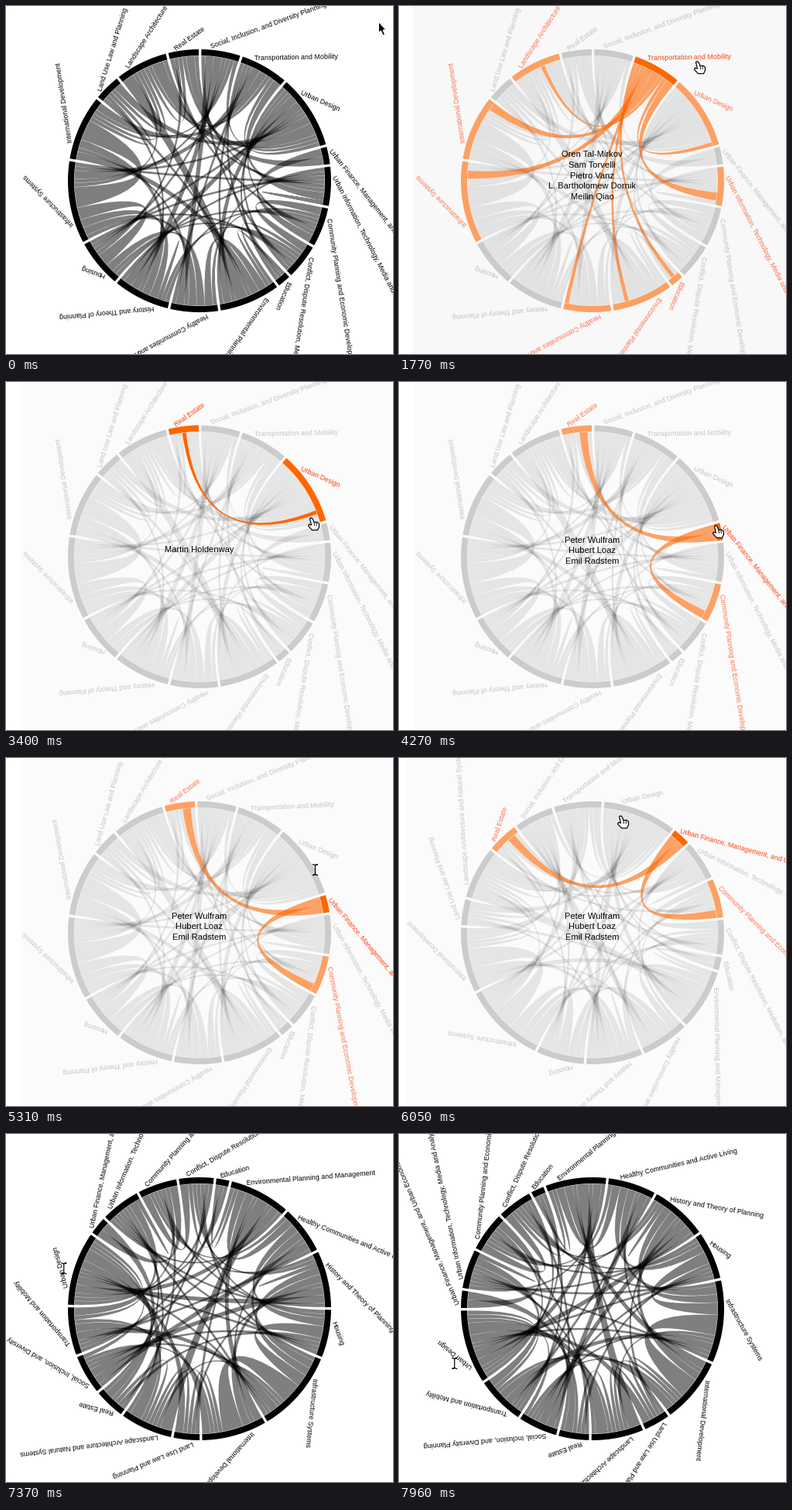
A matplotlib script that plays this animation: 500 by 450 pixels, repeating every 8 s.

```python
import numpy as np
import matplotlib.pyplot as plt
from matplotlib.animation import FuncAnimation
from matplotlib.collections import PathCollection
from matplotlib.patches import Polygon, Rectangle
from matplotlib.path import Path
from matplotlib.transforms import Affine2D

W, H, DPI = 500, 450, 100
CX, CY = 250, 226
R_OUT, R_IN, R_CHORD = 170, 162, 161.6
PAD, START = 1.15, 102.2
INTERVAL, FRAMES, STEP = 40, 200, 147.4

LABELS = {
    "com": "Community Planning and Economic Development",
    "con": "Conflict, Dispute Resolution, Mediation, and Negotiation",
    "edu": "Education",
    "env": "Environmental Planning and Management",
    "hea": "Healthy Communities and Active Living",
    "his": "History and Theory of Planning",
    "hou": "Housing",
    "inf": "Infrastructure Systems",
    "int": "International Development",
    "law": "Land Use Law and Planning",
    "lan": "Landscape Architecture and Natural Systems",
    "est": "Real Estate",
    "soc": "Social, Inclusion, and Diversity Planning",
    "tra": "Transportation and Mobility",
    "urb": "Urban Design",
    "fin": "Urban Finance, Management, and Urban Economics",
    "med": "Urban Information, Technology, Media and Analytics",
}
LINKS = {
    "com": "con2 hea1 his1 hou1 est1 urb1 fin2",
    "con": "env1 his1 hou1 inf1 soc1 urb1",
    "edu": "env1 tra1 urb1",
    "env": "hea2 int2 law1 lan3 tra1 urb2 med1",
    "hea": "hou2 inf2 int1 soc2 tra1",
    "his": "his1 inf2 int2 law1 soc2 urb2 med1",
    "hou": "inf3 est1 soc1 urb1 med1",
    "inf": "int5 lan1 soc1 tra2 urb1 med1",
    "int": "law1 lan1 soc1 tra2",
    "law": "lan1 urb2",
    "lan": "est1 tra1 urb3 med1",
    "est": "urb1 fin2 med1",
    "soc": "urb1",
    "tra": "urb1 med2",
    "med": "med1",
}
KEYS = list(LABELS)
N = len(KEYS)
ID = {key: i for i, key in enumerate(KEYS)}
EST, TRA, URB, FIN = (ID[key] for key in ("est", "tra", "urb", "fin"))

# Hover changes: step, hovered groups, background grey, names in the middle
HOVERS = [
    (0, (), 1.0, []),
    (5, (TRA,), 0.972, ["Oren Tal-Mirkov", "Sam Torvelli", "Pietro Vanz",
                        "L. Bartholomew Dornik", "Meilin Qiao"]),
    (15, (URB,), 0.976, ["Oren Tal-Mirkov", "Martin Holdenway", "Meilin Qiao"]),
    (20, (EST, URB), 0.984, ["Martin Holdenway"]),
    (26, (FIN,), 0.984, ["Peter Wulfram", "Hubert Loaz", "Emil Radstem"]),
    (43, (), 1.0, []),
]
FADE = 4

ORANGE = (1, 0.4, 0)
RED = (1, 0.25, 0.06)
BLACK = (0, 0, 0)


# ---------- layout ----------
matrix = np.zeros((N, N), int)
for key, row in LINKS.items():
    for link in row.split():
        a, b, n = ID[key], ID[link[:3]], int(link[3:])
        matrix[a, b] = matrix[b, a] = n

UNIT = (360 - N * PAD) / matrix.sum()
sizes = matrix.sum(axis=1) * UNIT
starts = START + np.concatenate([[0], np.cumsum(sizes + PAD)[:-1]])
sub_ends = starts[:, None] + np.cumsum(matrix, axis=1) * UNIT
sub_starts = sub_ends - matrix * UNIT
PAIRS = [(a, b) for a in range(N) for b in range(a, N) if matrix[a, b]]


def polar(angle, radius):
    """Clockwise degrees from the top, with y pointing down."""
    t = np.radians(angle)
    return np.column_stack([radius * np.sin(t), -radius * np.cos(t)])


def arc(a0, a1, radius):
    return polar(np.linspace(a0, a1, max(4, int(abs(a1 - a0)) + 2)), radius)


def ring_path(i):
    a0, a1 = starts[i], starts[i] + sizes[i]
    pts = np.vstack([arc(a0, a1, R_OUT), arc(a1, a0, R_IN)])
    return Path(np.vstack([pts, pts[:1]]))


def chord_path(a, b, inset=0.05):
    ends = [arc(sub_starts[p, q] + inset, sub_ends[p, q] - inset, R_CHORD)
            for p, q in ((a, b), (b, a))]
    hub = [[0, 0]]
    verts = np.vstack([ends[0], hub, ends[1], hub, ends[0][:1]])
    codes = ([Path.MOVETO] + [Path.LINETO] * (len(ends[0]) - 1)
             + [Path.CURVE3] * 2 + [Path.LINETO] * (len(ends[1]) - 1)
             + [Path.CURVE3] * 2)
    return Path(verts, codes)


RINGS = [ring_path(i) for i in range(N)]
CHORDS = [chord_path(a, b) for a, b in PAIRS]


# ---------- colours of one hover state ----------
def rank_chord(pair, hover):
    """2 = hovered, 1 = related, 0 = not involved."""
    if len(hover) == 2:
        return 2 if pair == hover else 0
    return 1 if hover and hover[0] in pair else 0


def rank_group(i, hover):
    if i in hover:
        return 2
    return 1 if len(hover) == 1 and matrix[i, hover[0]] else 0


def shades(ranks, hover, idle, dim, hot, warm):
    if not hover:
        return np.array([(*BLACK, idle)] * len(ranks))
    table = [(*BLACK, dim), (*hot, warm), (*hot, 1)]
    return np.array([table[r] for r in ranks])


def look(hover):
    groups = [rank_group(i, hover) for i in range(N)]
    chords = [rank_chord(p, hover) for p in PAIRS]
    return (shades(chords, hover, 0.5, 0.085, ORANGE, 0.6),
            shades(groups, hover, 1, 0.185, ORANGE, 0.6),
            shades(groups, hover, 1, 0.22, RED, 0.72),
            np.array(chords))


LOOKS = [look(h[1]) for h in HOVERS]


# ---------- motion ----------
def rotation(k):
    return np.interp(k, [35, 36, 38, 41, 46, 54],
                     [0, -1.7, -11, -36.2, -94.5, -164.7])


def cursor_at(k):
    if k >= 36:
        keys = [36, 41, 46, 54]
        angle = np.interp(k, keys, [61.2, 15.2, -35.2, -111.4])
        radius = np.interp(k, keys, [170, 149, 175, 192])
        x, y = polar([angle], radius)[0]
        return CX + x, CY + y
    keys = [2, 5, 8, 11, 12, 16, 20, 23, 26, 28, 33, 35, 36]
    xs = [485, 440, 391, 391, 388, 399, 402, 397, 404, 412, 412, 403, 399]
    ys = [29, 48, 74, 74, 79, 122, 165, 183, 190, 193, 193, 152, 144]
    return np.interp(k, keys, xs), np.interp(k, keys, ys)


def cursor_kind(k):
    if k < 6:
        return "arrow"
    return "hand" if k < 35 or 39 <= k < 44 else "beam"


# ---------- artists ----------
plt.rcParams["font.family"] = "Liberation Sans"
fig = plt.figure(figsize=(W / DPI, H / DPI), dpi=DPI, facecolor="white")
ax = fig.add_axes([0, 0, 1, 1])
ax.set_xlim(0, W)
ax.set_ylim(H, 0)
ax.axis("off")


def px(size):
    return size * 72 / DPI


back = ax.add_patch(Rectangle((18, 0), W, H, lw=0, zorder=0))
chord_art = PathCollection(CHORDS, linewidths=0, zorder=1)
ring_art = PathCollection(RINGS, linewidths=0, zorder=2)
for art in (chord_art, ring_art):
    ax.add_collection(art, autolim=False)

label_art = [ax.text(0, 0, text, fontsize=px(8.85), ha="left", va="baseline",
                     rotation_mode="anchor", zorder=3)
             for text in LABELS.values()]
name_art = [ax.text(CX - 0.5, 0, "", fontsize=px(11.1), ha="center",
                    va="baseline", zorder=4) for _ in range(5)]

SHAPES = {
    "arrow": [(-4, -9), (-4, 5), (-1, 2.5), (1.5, 8.5), (4, 7.5), (1.5, 1.5),
              (5.5, 1.5)],
    "hand": [(-5, -7), (-3, -8), (-1, -6), (0.5, -2), (4, -2.5), (7, -0.5),
             (7, 4), (5, 8), (-2, 8), (-7, 2.5), (-6, 0.5), (-3, 1.5)],
}
cursors = {
    "arrow": [ax.add_patch(Polygon(SHAPES["arrow"], fc="black", ec="white",
                                   lw=px(1), zorder=6))],
    "hand": [ax.add_patch(Polygon(SHAPES["hand"], fc="white", ec="black",
                                  lw=px(1.2), joinstyle="round", zorder=6))],
    "beam": ax.plot([], [], color="black", lw=px(1.2), zorder=6),
}
fingers = ax.plot([], [], color="black", lw=px(0.9), zorder=7)[0]
cursors["hand"].append(fingers)
BEAM = np.array([(-3, -7), (0, -6), (3, -7), (0, -6), (0, 6), (-3, 7),
                 (0, 6), (3, 7)])
KNUCKLES = np.array([(0.5, -2), (1, 2), (np.nan, 0), (3.5, -2), (3.8, 2)])


def draw_cursor(k):
    spot = np.array(cursor_at(k)) + 0.5
    kind = cursor_kind(k)
    for name, arts in cursors.items():
        for art in arts:
            art.set_visible(name == kind)
    if kind == "beam":
        cursors["beam"][0].set_data(*(BEAM + spot).T)
    else:
        cursors[kind][0].set_xy(np.array(SHAPES[kind]) + spot)
        fingers.set_data(*(KNUCKLES + spot).T)


def draw_labels(turn, colors):
    anchors = starts + 0.23 * sizes + turn
    for art, angle, color in zip(label_art, anchors, colors):
        tilt = angle - 25
        t = np.radians(tilt)
        x, y = polar([angle], 174)[0]
        art.set_position((CX + x - 3.2 * np.sin(t), CY + y + 3.2 * np.cos(t)))
        art.set_rotation(-tilt)
        art.set_color(color)


def draw_names(names):
    top = 226.5 - 6.3 * len(names)
    for n, art in enumerate(name_art):
        art.set_text(names[n] if n < len(names) else "")
        art.set_y(top + 13.8 * n)


def update(i):
    k = int((i * INTERVAL + INTERVAL - 1) / STEP)
    now = max(n for n, h in enumerate(HOVERS) if h[0] <= k)
    prev = max(now - 1, 0)
    mix = min(1, (k - HOVERS[now][0] + 1) / FADE)
    chords, rings, labels = (
        (1 - mix) * old + mix * new
        for old, new in zip(LOOKS[prev][:3], LOOKS[now][:3]))
    grey = (1 - mix) * HOVERS[prev][2] + mix * HOVERS[now][2]

    turn = rotation(k)
    place = Affine2D().rotate_deg(turn).translate(CX, CY) + ax.transData
    order = np.argsort(LOOKS[now][3], kind="stable")
    chord_art.set_paths([CHORDS[n] for n in order])
    chord_art.set_facecolor(chords[order])
    ring_art.set_facecolor(rings)
    chord_art.set_transform(place)
    ring_art.set_transform(place)

    back.set_x(18 if k < 37 else 9)
    back.set_facecolor((grey, grey, grey))
    draw_labels(turn, labels)
    draw_names(HOVERS[now][3])
    draw_cursor(k)
    return []


anim = FuncAnimation(fig, update, frames=FRAMES, interval=INTERVAL,
                     init_func=lambda: update(0), repeat=True, repeat_delay=0,
                     blit=False)
plt.show()
```
